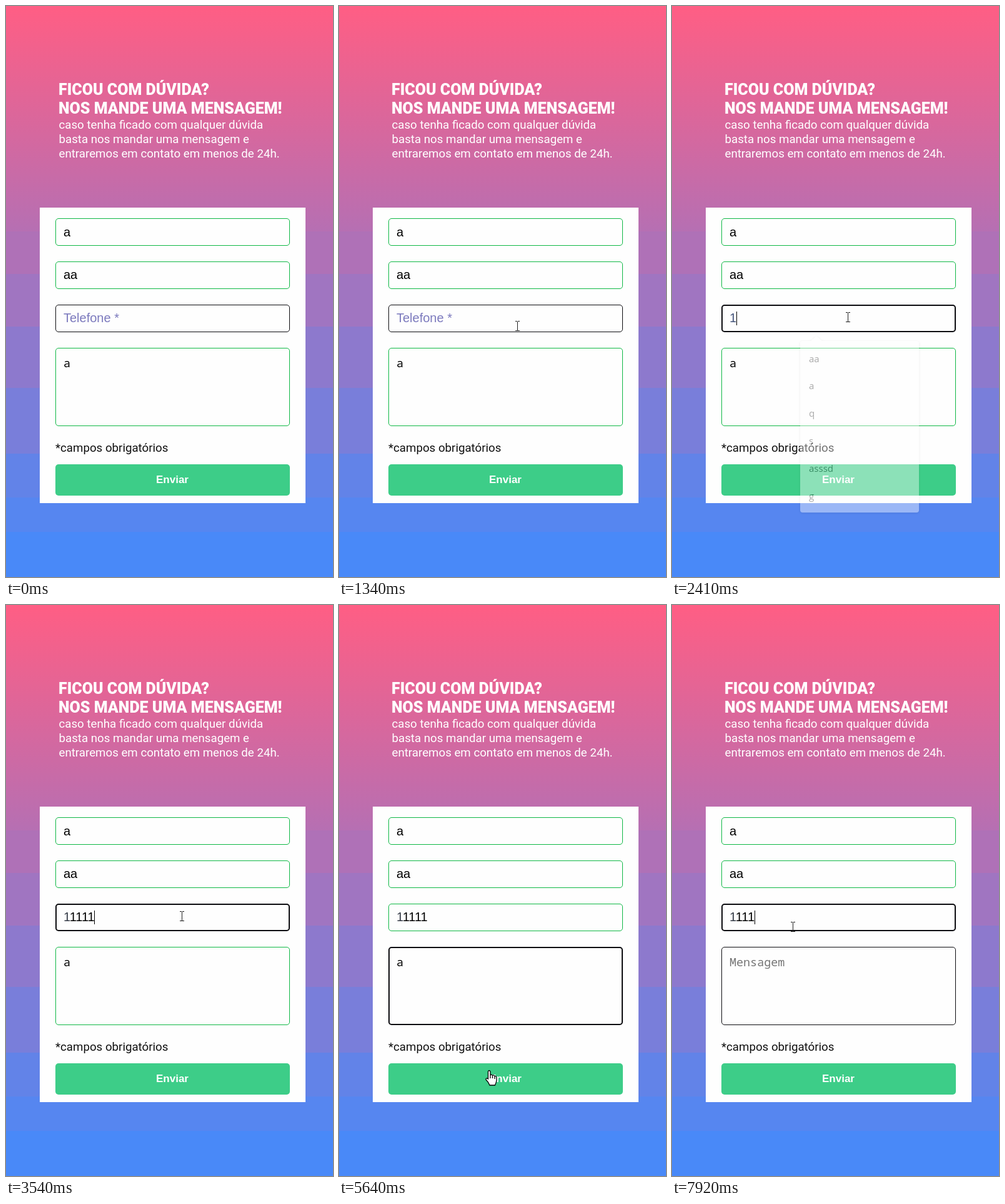
An HTML page with a canvas that plays this animation: 523 by 912 pixels, repeating every 8 s.

```html
<!DOCTYPE html>
<html lang="pt-BR">
<head>
<meta charset="utf-8">
<title>Formulário de contato</title>
<style>
  html, body { margin: 0; width: 100%; height: 100%; overflow: hidden; }
  canvas { display: block; width: 523px; height: 912px; }
</style>
</head>
<body>
<canvas id="stage" width="523" height="912"></canvas>
<script>
const W = 523, H = 912, LOOP = 8000, BLINK = 530;
const stage = document.getElementById('stage').getContext('2d');
let ctx = stage;
const ROBOTO = 'Roboto, sans-serif';
const ARIAL = '"Liberation Sans", Arial, sans-serif';
const MONO = '"Noto Sans Mono", monospace';
const GREEN = '#0fb845', BLACK = '#0c0c10';

const LEFT = 79, FIELD_W = 375, TEXT_X = 92, RADIUS = 5;
const nameBox = [339, 44], mailBox = [408, 44], phoneBox = [477, 44], messageBox = [546, 125];
const buttonBox = [732, 50];

// Pointer path: time, x, y of the hot spot
const path = [
  [210, 444, 904], [980, 319, 556], [1060, 308, 543], [1340, 285, 511], [1500, 281, 497],
  [4140, 281, 497], [4680, 270, 698], [4810, 262, 720], [5000, 240, 743],
  [6260, 240, 743], [6600, 213, 577], [7320, 213, 577], [7570, 195, 520], [7700, 193, 514]
];
const clicks = [[1560, 1770], [5040, 5180], [5710, 5780], [6180, 6260], [6600, 6850], [7600, 7780]];
const typed = [2340, 2520, 2810, 3210, 3540];
const focusSpans = [
  [1610, 5040, 'phone'], [5110, 5710, 'message'], [5780, 6180, 'message'],
  [6250, 7610, 'message'], [7610, LOOP, 'phone']
];
const caretResets = [1610, ...typed, 5110, 5780, 6250, 6650, 7250, 7610, 7850];
const CLEARED = 7250, BACKSPACE = 7850;

const clamp = v => Math.max(0, Math.min(1, v));
const within = (t, [from, to]) => t >= from && t < to;

function text(str, x, y, font, color) {
  ctx.font = font;
  ctx.fillStyle = color;
  ctx.fillText(str, x, y);
}

function roundRect(x, y, w, h, r) {
  ctx.beginPath();
  ctx.roundRect(x, y, w, h, r);
}

function polygon(points) {
  ctx.beginPath();
  points.forEach(([x, y]) => ctx.lineTo(x, y));
  ctx.closePath();
}

function field([y, h], color, width = 1) {
  roundRect(LEFT + width / 2, y + width / 2, FIELD_W - width, h - width, RADIUS - width / 2);
  ctx.strokeStyle = color;
  ctx.lineWidth = width;
  ctx.stroke();
}

function background() {
  const top = [255, 94, 132], bottom = [70, 138, 250];
  const mix = y => `rgb(${top.map((c, i) => Math.round(c + (bottom[i] - c) * y / H))})`;
  const fade = ctx.createLinearGradient(0, 0, 0, H);
  fade.addColorStop(0, mix(0));
  fade.addColorStop(1, mix(H));
  ctx.fillStyle = fade;
  ctx.fillRect(0, 0, W, H);
  const edges = [360, 428, 512, 610, 715, 785, 840, H];
  for (let i = 0; i < edges.length - 1; i++) {
    ctx.fillStyle = mix((edges[i] + edges[i + 1]) / 2 + (i > 3 ? 22 : 0));
    ctx.fillRect(0, edges[i], W, edges[i + 1] - edges[i]);
  }
}

function heading() {
  const title = `900 25px ${ROBOTO}`, body = `18.72px ${ROBOTO}`;
  text('FICOU COM DÚVIDA?', 84, 142, title, '#fff');
  text('NOS MANDE UMA MENSAGEM!', 84, 172, title, '#fff');
  ['caso tenha ficado com qualquer dúvida', 'basta nos mandar uma mensagem e',
    'entraremos em contato em menos de 24h.']
    .forEach((line, i) => text(line, 84.5, 196 + 23 * i, body, '#fff'));
}

function caret(t, x, y) {
  const last = caretResets.filter(r => r <= t).pop();
  if (Math.floor((t - last) / BLINK) % 2) return;
  ctx.fillStyle = '#000';
  ctx.fillRect(Math.floor(x), y, 1, 22);
}

function form(t) {
  const span = focusSpans.find(s => within(t, s));
  const focus = span && span[2];
  const count = typed.filter(k => k <= t).length - (t >= BACKSPACE ? 1 : 0);
  const phone = '1'.repeat(count), message = t < CLEARED ? 'a' : '';
  const input = `20px ${ARIAL}`, area = `18.4px ${MONO}`;

  ctx.fillStyle = '#fefefe';
  ctx.fillRect(54, 322, 425, 472);
  field(nameBox, GREEN);
  field(mailBox, GREEN);
  const border = (box, id, value) => focus === id
    ? field(box, BLACK, 2) : field(box, value ? GREEN : BLACK);
  border(phoneBox, 'phone', phone);
  border(messageBox, 'message', message);

  text('a', TEXT_X, 368, input, '#000');
  text('aa', TEXT_X, 436, input, '#000');
  if (phone) {
    text(phone, TEXT_X, 505, input, '#000');
    ctx.save();
    ctx.beginPath();
    ctx.rect(TEXT_X, 485, 10, 24);
    ctx.clip();
    ctx.fillStyle = '#fefefe';
    ctx.fillRect(TEXT_X, 485, 10, 24);
    text('1', TEXT_X, 505, input, count === 1 ? '#46567c' : '#363c48');
    ctx.restore();
  } else {
    text('Telefone *', TEXT_X, 505, input, '#7b79bd');
  }
  if (message) text(message, TEXT_X, 577, `500 ${area}`, '#000');
  else text('Mensagem', TEXT_X, 577, area, '#757575');
  if (focus === 'phone') {
    ctx.font = input;
    caret(t, TEXT_X + ctx.measureText(phone).width, 488);
  }
  if (focus === 'message') caret(t, TEXT_X + message.length * 11, 560);

  text('*campos obrigatórios', LEFT, 712, `18.72px ${ROBOTO}`, '#111');
  roundRect(LEFT, buttonBox[0], FIELD_W, buttonBox[1], RADIUS);
  ctx.fillStyle = '#3dcd88';
  ctx.fill();
  ctx.textAlign = 'center';
  text('Enviar', 266, 762, `700 17px ${ARIAL}`, '#fff');
  ctx.textAlign = 'left';
}

// The popup is painted once on its own layer so that it fades as a whole
function paintSuggestions() {
  const layer = document.createElement('canvas');
  layer.width = W;
  layer.height = H;
  ctx = layer.getContext('2d');
  ctx.shadowColor = 'rgba(0,0,0,.2)';
  ctx.shadowBlur = 4;
  ctx.shadowOffsetY = 1;
  ctx.fillStyle = '#fff';
  roundRect(205, 535, 190, 274, 4);
  ctx.moveTo(222, 535);
  ctx.lineTo(231, 527);
  ctx.lineTo(240, 535);
  ctx.fill();
  ctx.shadowColor = 'transparent';
  ['aa', 'a', 'q', 's', 'asssd', 'g'].forEach((word, i) =>
    text(word, 219, 568.5 + 43.8 * i, '15px "Open Sans", sans-serif', '#333'));
  ctx = stage;
  return layer;
}

let popup;
function suggestions(t) {
  const alpha = t < 2300 ? clamp((t - 1640) / 180) : clamp(1 - (t - 2310) / 170);
  if (!alpha) return;
  popup ??= paintSuggestions();
  ctx.globalAlpha = alpha;
  ctx.drawImage(popup, 0, 0);
  ctx.globalAlpha = 1;
}

function pointerAt(t) {
  const next = path.findIndex(p => p[0] > t);
  if (next < 0) return path[path.length - 1].slice(1);
  const [t0, x0, y0] = path[next - 1], [t1, x1, y1] = path[next];
  const k = (t - t0) / (t1 - t0);
  return [x0 + (x1 - x0) * k, y0 + (y1 - y0) * k];
}

function beam() {
  ctx.fillStyle = '#222';
  ctx.fillRect(0, -7, 1, 15);
  for (const y of [-8, 7]) {
    ctx.fillRect(-3, y, 3, 1);
    ctx.fillRect(1, y, 3, 1);
  }
}

function arrow() {
  polygon([[0, 0], [0, 23], [5, 18.5], [9.5, 28], [13, 26.5], [9, 17], [16, 17]]);
  ctx.lineWidth = 1.5;
  ctx.strokeStyle = '#fff';
  ctx.stroke();
  ctx.fillStyle = '#000';
  ctx.fill();
}

function hand() {
  ctx.beginPath();
  ctx.moveTo(-1.5, 14);
  ctx.lineTo(-1.5, 2);
  ctx.quadraticCurveTo(0, -1, 2, 2);
  ctx.lineTo(2, 8);
  ctx.quadraticCurveTo(4, 6, 5.5, 8.5);
  ctx.quadraticCurveTo(8, 7, 9, 9.5);
  ctx.quadraticCurveTo(12, 9, 12, 12);
  ctx.lineTo(12, 16);
  ctx.quadraticCurveTo(11.5, 20, 9.5, 24);
  ctx.lineTo(1, 24);
  ctx.quadraticCurveTo(-1, 19, -5, 15);
  ctx.quadraticCurveTo(-5.5, 11.5, -1.5, 14);
  ctx.closePath();
  ctx.fillStyle = '#fff';
  ctx.fill();
  ctx.strokeStyle = '#000';
  ctx.lineWidth = 1.3;
  ctx.moveTo(2, 8);
  ctx.lineTo(2, 13);
  ctx.moveTo(5.5, 9);
  ctx.lineTo(5.5, 13);
  ctx.moveTo(9, 10);
  ctx.lineTo(9, 14);
  ctx.stroke();
}

function pointer(t) {
  if (t < path[0][0]) return;
  const [x, y] = pointerAt(t).map(Math.round);
  if (clicks.some(c => within(t, c))) {
    ctx.beginPath();
    ctx.arc(x - 2, y - 1, 15, 0, 2 * Math.PI);
    ctx.fillStyle = 'rgba(255,243,0,.5)';
    ctx.fill();
  }
  const over = ([top, h]) => x >= LEFT && x < LEFT + FIELD_W && y >= top && y < top + h;
  ctx.save();
  ctx.translate(x, y);
  if (over(buttonBox)) hand();
  else if ([phoneBox, messageBox].some(over)) beam();
  else arrow();
  ctx.restore();
}

function draw(now) {
  const t = now % LOOP;
  background();
  heading();
  form(t);
  suggestions(t);
  pointer(t);
}

const start = performance.now();
function tick() {
  draw(performance.now() - start);
  requestAnimationFrame(tick);
}
tick();
</script>
</body>
</html>
```
